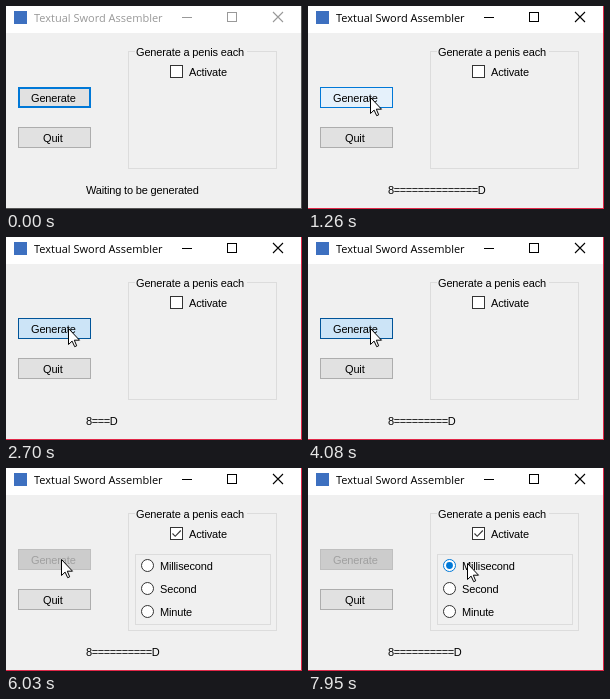
Animation of 296 by 203 pixels, one loop 8000 ms. Source, as an HTML page with a canvas:

```html
<!DOCTYPE html>
<html lang="en">
<head>
<meta charset="utf-8">
<title>Textual Sword Assembler</title>
<style>
  html, body { margin: 0; width: 100%; height: 100%; overflow: hidden; background: #f0f0f0; }
  canvas { display: block; }
</style>
</head>
<body>
<canvas id="stage" width="296" height="203"></canvas>
<script>
const ctx = document.getElementById('stage').getContext('2d', { alpha: false });
const LOOP = 8000, STEP = 30;
const BLUE = '#0078d7', DARK_BLUE = '#005499', HOVER = '#e5f1fb', PRESSED = '#cce4f7';
const FACE = '#f0f0f0', BUTTON = '#e1e1e1', GROOVE = '#dcdcdc', DARK = '#333';
const UI_FONT = '11px "Liberation Sans", Arial, sans-serif';
const TITLE_FONT = '11px "Open Sans", "Noto Sans", sans-serif';

// Key moments
const ACTIVATE = 1020, CHECK_DOWN = 5250, CHECK_UP = 5310, RADIO_DOWN = 7260, RADIO_UP = 7350;
const CLICK_HOLD = 90, TIMER_START = 7440, TIMER_PERIOD = 102;

// One shaft length per click; the pace of the clicks slows slightly
const clickLengths = [14, 4, 2, 5, 3, 5, 4, 2, 9, 10];
const clickTime = i => i === 0 ? ACTIVATE : 1470 + 288 * (i - 1) + 4.75 * (i - 1) ** 2;

// The pointer glides from stop to stop, sagging by `sag` at the middle of its curve
const entry = { x: 296, y: 46 };
const stops = [
  { start: 180, end: 930, x: 62, y: 91, sag: -26 },
  { start: 4260, end: 4860, x: 209, y: 56, sag: -50 },
  { start: 4890, end: 5070, x: 208, y: 62, sag: 0 },
  { start: 5550, end: 6030, x: 55, y: 91, sag: 26 },
  { start: 6390, end: 6840, x: 159, y: 95, sag: 3 }
];

const between = (v, from, to) => v >= from && v < to;

function pointerAt(t) {
  const i = stops.findLastIndex(s => t > s.start);
  if (i < 0) return { x: 400, y: 0 };
  const from = stops[i - 1] || entry, to = stops[i];
  const p = Math.min(1, (t - to.start) / (to.end - to.start));
  const k = p * p * (3 - 2 * p);
  return {
    x: Math.round(from.x + (to.x - from.x) * k),
    y: Math.round(from.y + (to.y - from.y) * k + 2 * to.sag * k * (1 - k))
  };
}

function resultAt(t) {
  const tick = Math.floor((t - TIMER_START) / TIMER_PERIOD);
  const shaft = tick >= 0
    ? 1 + (7 * tick + 4) % 10
    : clickLengths.findLast((_, i) => t >= clickTime(i) + CLICK_HOLD);
  return shaft && '8' + '='.repeat(shaft) + 'D';
}

function rect(x, y, w, h, fill) {
  ctx.fillStyle = fill;
  ctx.fillRect(x, y, w, h);
}

function outline(x, y, w, h, color) {
  ctx.lineWidth = 1;
  ctx.strokeStyle = color;
  ctx.strokeRect(x + .5, y + .5, w - 1, h - 1);
}

function box(x, y, w, h, fill, border) {
  rect(x, y, w, h, fill);
  outline(x, y, w, h, border);
}

function paint(path, fill, stroke, width = 1) {
  if (fill) {
    ctx.fillStyle = fill;
    ctx.fill(path);
  }
  if (stroke) {
    ctx.strokeStyle = stroke;
    ctx.lineWidth = width;
    ctx.stroke(path);
  }
}

function disc(x, y, r) {
  const path = new Path2D();
  path.arc(x, y, r, 0, 2 * Math.PI);
  return path;
}

function text(str, x, y, color = '#000', spacing = -.16, font = UI_FONT) {
  ctx.font = font;
  ctx.letterSpacing = spacing + 'px';
  ctx.fillStyle = color;
  ctx.fillText(str, x, y);
}

function drawFrame(active) {
  const ink = active ? '#000' : '#999';
  const edge = active ? '#e02848' : '#555';
  rect(0, 0, 296, 203, FACE);
  rect(0, 0, 296, 27, '#fff');
  rect(8, 5, 13, 13, '#3d70c0');
  text('Textual Sword Assembler', 28, 16, ink, 0, TITLE_FONT);
  rect(176, 11, 10, 1, ink);
  outline(221, 6, 10, 10, ink);
  paint(new Path2D('M267 6l10 10m0-10l-10 10'), null, ink, 1.1);
  outline(-1, -1, 297, 204, edge);
}

function drawGenerate(hovered, pressed, disabled) {
  const [fill, border] = disabled ? ['#ccc', '#bfbfbf']
    : pressed ? [PRESSED, DARK_BLUE]
    : hovered ? [HOVER, BLUE]
    : [BUTTON, BLUE];
  box(12, 81, 73, 21, fill, border);
  if (fill === BUTTON) outline(13, 82, 71, 19, BLUE);
  text('Generate', 25, 96, disabled ? '#a0a0a0' : '#000');
}

const inkFor = (hovered, pressed) => pressed ? DARK_BLUE : hovered ? BLUE : DARK;

function drawCheckbox(hovered, pressed, checked) {
  const ink = inkFor(hovered, pressed);
  box(164, 59, 13, 13, pressed ? PRESSED : '#fff', ink);
  if (checked) paint(new Path2D('M166.5 65.5l2.7 2.8l5.6-5.8'), null, ink, 1.1);
  text('Activate', 183, 70);
}

function drawRadio(label, y, hovered, pressed, selected) {
  const ink = inkFor(hovered, pressed);
  paint(disc(141.5, y, 6), pressed ? PRESSED : '#fff', ink);
  if (selected) paint(disc(141.5, y, 3.4), ink);
  text(label, 154, y + 4.5);
}

function drawPointer({ x, y }) {
  ctx.save();
  ctx.translate(x + .5, y + .5);
  paint(new Path2D('M0 0v16l3.6-3.4l2.6 5.6l2-.9l-2.4-5.6h5.2z'), '#fff', '#000');
  ctx.restore();
}

function draw(t) {
  const pointer = pointerAt(t);
  const over = (x, y, w, h) => between(pointer.x, x, x + w) && between(pointer.y, y, y + h);
  const clicking = clickLengths.some((_, i) => between(t, clickTime(i), clickTime(i) + CLICK_HOLD));
  const checked = t >= CHECK_UP;

  drawFrame(t >= ACTIVATE);
  drawGenerate(over(12, 81, 73, 21), clicking, checked);
  box(12, 121, 73, 21, BUTTON, '#adadad');
  text('Quit', 37, 136);

  outline(122, 45, 149, 118, GROOVE);
  rect(129, 44, 112, 3, FACE);
  text('Generate a penis each', 130, 50);
  drawCheckbox(over(164, 58, 60, 16), between(t, CHECK_DOWN, CHECK_UP), checked);

  if (checked) {
    outline(129, 86, 136, 71, GROOVE);
    ['Millisecond', 'Second', 'Minute'].forEach((label, i) => {
      const y = 97.5 + 23 * i, first = i === 0;
      drawRadio(label, y, over(135, y - 8, 74, 17),
        first && between(t, RADIO_DOWN, RADIO_UP), first && t >= RADIO_UP);
    });
  }

  const result = resultAt(t);
  if (result) text(result, 80, 188, '#000', -.42);
  else text('Waiting to be generated', 80, 188);

  drawPointer(pointer);
}

function loop() {
  const t = performance.now() % LOOP;
  draw(Math.floor(t / STEP) * STEP);
  requestAnimationFrame(loop);
}
loop();
</script>
</body>
</html>
```
